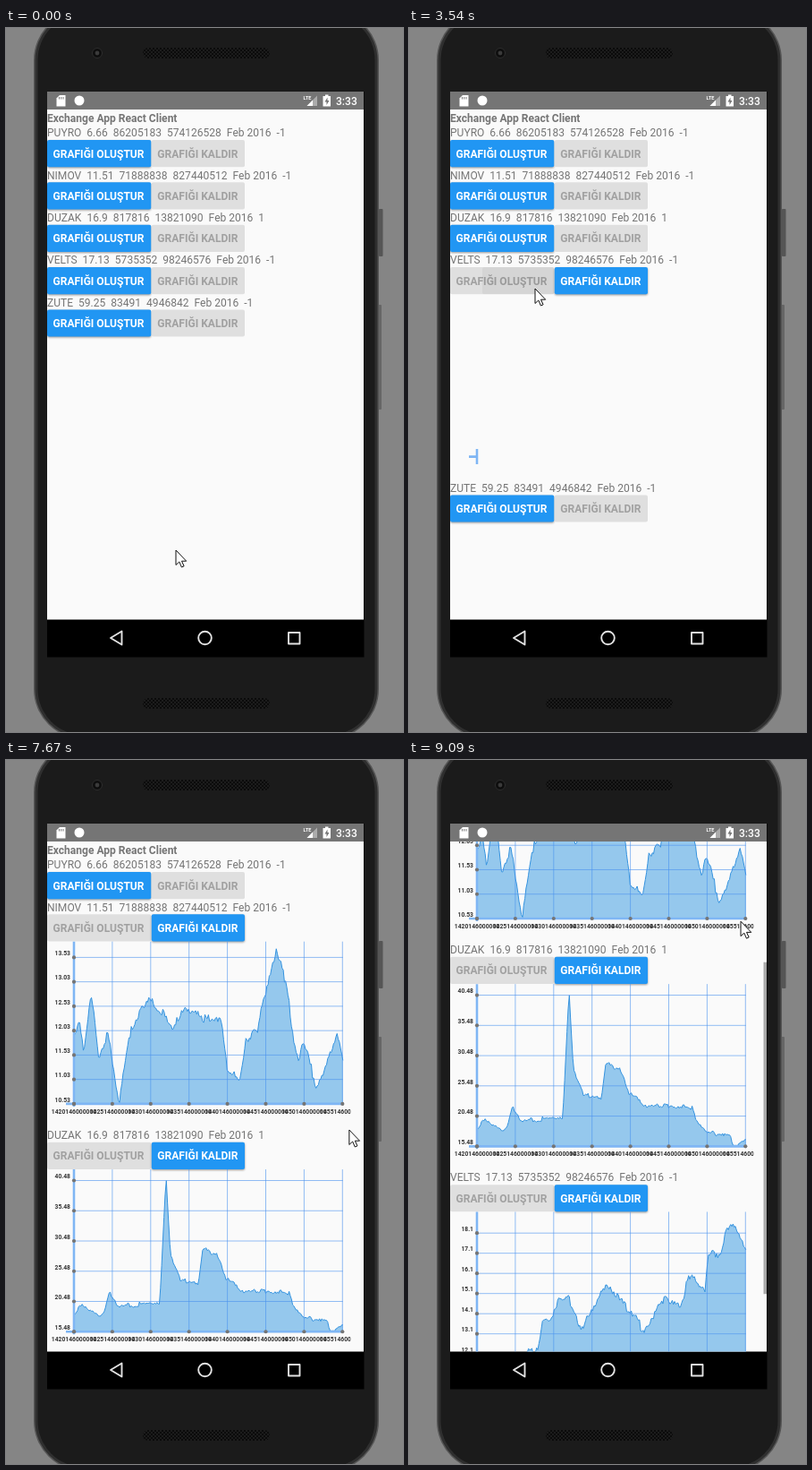
An HTML page that plays this animation: 444x786 px, repeating every 9.12 s.

```html
<!DOCTYPE html>
<html lang="tr">
<head>
<meta charset="utf-8">
<style>
  html, body { margin: 0; width: 100%; height: 100%; overflow: hidden; background: #858585; }
  svg { display: block; width: 444px; height: 786px; }
  text { font: 12.05px Roboto, sans-serif; fill: #757575; white-space: pre; }
  .bold { font-weight: 700; }
  .label { font-weight: 700; fill: #fff; }
  .clock { font-weight: 500; fill: #fff; }
  .off .label { fill: #a1a1a1; }
  .face { fill: #2196f3; filter: drop-shadow(0 1.2px 1.2px #0006); }
  .off .face { fill: #dfdfdf; filter: none; }
  .tick { font-size: 6.75px; font-weight: 700; fill: #333; }
  .grid { stroke: #4a92ee; stroke-opacity: .6; fill: none; }
  .axis { stroke: #7fb6f4; stroke-width: 2.6; fill: none; }
  .area { fill: #95c8ed; }
  .line { fill: none; stroke: #3492de; stroke-linejoin: round; }
  .nav { fill: none; stroke: #e2e2e2; stroke-width: 1.9; stroke-linejoin: round; }
</style>
</head>
<body>
<svg viewBox="0 0 444 786">
  <defs>
    <pattern id="holes" width="4" height="4" patternUnits="userSpaceOnUse">
      <rect width="4" height="4" fill="#0b0b0b"/><circle cx="1" cy="1" r=".8" fill="#303030"/><circle cx="3" cy="3" r=".8" fill="#303030"/>
    </pattern>
    <clipPath id="view"><rect x="46" y="91" width="354" height="569.5"/></clipPath>
    <clipPath id="plot"><rect x="46" y="-2" width="339.5" height="206"/></clipPath>
  </defs>

  <rect x="417" y="202" width="4.5" height="53" rx="1" fill="#555"/>
  <rect x="416" y="309" width="4" height="117" rx="1" fill="#666"/>
  <rect x="31" y="-20" width="386" height="814" rx="56" fill="#555"/>
  <rect x="32.5" y="-18.5" width="383" height="811" rx="54.5" fill="#2f2f2f"/>
  <rect x="35.5" y="-15.5" width="377" height="805" rx="51.5" fill="#1b1b1b"/>
  <circle cx="102" cy="28" r="5.5" fill="#0e0e0e" stroke="#2e2e2e"/>
  <circle cx="102" cy="28" r="2.4" fill="#3a3a3a"/>
  <rect x="153" y="22" width="142" height="12" rx="6" fill="url(#holes)"/>
  <rect x="153" y="748" width="142" height="12" rx="6" fill="url(#holes)"/>

  <rect x="46" y="71" width="354.5" height="631.5"/>
  <rect x="46" y="91" width="354" height="569.5" fill="#fafafa"/>
  <g clip-path="url(#view)">
    <g id="list"><text class="bold" x="46" y="104.7">Exchange App React Client</text></g>
    <rect id="bar" x="396.5" width="3.5" height="370.5" fill="#a9a9a9"/>
  </g>

  <rect x="46" y="71" width="354" height="20" fill="#757575"/>
  <g fill="#fff">
    <path d="M60 75h6.5v12.5h-10v-9z"/>
    <path d="M59.5 77v2.5M61.7 77v2.5M64 77v2.5" stroke="#757575"/>
    <circle cx="82" cy="81" r="5.5"/>
    <path d="M348 75.5v11.5h-11.5z" opacity=".4"/>
    <path d="M343 80.5v6.5h-6.5z"/>
    <path d="M357 76v-1.5h3.5v1.5h2.5v11.5h-8.5v-11.5z"/>
    <path d="M359.5 77.5l-3 5h2v3.5l3-5h-2z" fill="#757575"/>
  </g>
  <text x="332.5" y="80" style="font-size:5.5px;font-weight:700;fill:#fff">LTE</text>
  <text class="clock" x="369" y="85.7">3:33</text>

  <path class="nav" d="M129.5 673.5v15l-12.5-7.5z"/>
  <circle class="nav" cx="222.5" cy="681" r="7.3"/>
  <rect class="nav" x="316" y="675" width="12.5" height="12.5"/>

  <path id="cursor" d="M0 0V16.5L3.8 13l2.6 6 2.7-1.2-2.6-5.6h5.2z" fill="#fff" stroke="#111"/>
</svg>

<script>
const LOOP = 9120, DRAG = 7975, TOP = 108, ROW = 47.35, CHART = 207, BASE = 181.2;
const LEFT = 76, STEP_X = 42.9, RIGHT = LEFT + 7 * STEP_X + .5;

// trend: key points (x, height above the axis) that seeded noise roughens
// open: row unfolds, ready: chart is drawn, ripple: left edge of the pressed tint
const rows = [
  { text: 'PUYRO  6.66  86205183  574126528  Feb 2016  -1' },
  { text: 'NIMOV  11.51  71888838  827440512  Feb 2016  -1', open: 6070, ready: 6510, ripple: 46,
    min: 10.53, step: .5, ticks: 7, gap: 27.25, digits: 2, jitter: 13,
    trend: [[76, 75], [82, 92], [87, 56], [95, 129], [104, 54], [114, 76], [127, 3], [140, 88], [161, 118],
      [186, 86], [203, 106], [241, 90], [249, 30], [262, 28], [268, 72], [281, 82], [302, 173], [315, 128],
      [319, 84], [327, 46], [333, 70], [347, 18], [358, 40], [370, 78], [376.5, 54]] },
  { text: 'DUZAK  16.9  817816  13821090  Feb 2016  1', open: 4880, ready: 5230, ripple: 46,
    min: 15.48, step: 5, ticks: 6, gap: 33.75, digits: 2, jitter: 6,
    trend: [[76, 20], [84, 29], [108, 19], [116, 42], [127, 28], [172, 33], [179, 173], [184, 86], [195, 57],
      [215, 54], [220, 94], [236, 85], [246, 60], [262, 46], [317, 43], [321, 28], [334, 15], [359, 12],
      [362, 0], [367, 0], [376.5, 9]] },
  { text: 'VELTS  17.13  5735352  98246576  Feb 2016  -1', open: 3450, ready: 3990, ripple: 82,
    min: 11.1, step: 1, ticks: 8, gap: 22.5, digits: 1, jitter: 11,
    trend: [[76, 17], [115, 6], [144, 32], [149, 57], [160, 62], [168, 88], [180, 82], [193, 48], [220, 102],
      [240, 78], [263, 48], [283, 82], [307, 78], [312, 112], [331, 92], [335, 134], [349, 134], [355, 162],
      [365, 164], [376.5, 140]] },
  { text: 'ZUTE  59.25  83491  4946842  Feb 2016  -1', open: 820, ready: 1370, close: 2250, ripple: 46,
    min: 46.82, step: 5, ticks: 6, gap: 30.8, digits: 2, jitter: 10,
    trend: [[76, 25], [82, 46], [86, 112], [98, 124], [119, 78], [128, 6], [132, 66], [165, 90], [168, 150],
      [178, 150], [186, 104], [192, 46], [198, 132], [213, 166], [219, 125], [238, 76], [265, 78], [275, 116],
      [313, 128], [322, 95], [332, 66], [338, 86], [352, 62], [370, 58], [371, 128], [376.5, 78]] }
];

// start, end, x, y; the pointer rests between moves
const moves = [
  [0, 0, 190, 583], [100, 740, 126, 333], [1660, 2000, 176, 332], [2840, 3400, 141, 291], [4280, 4690, 125, 238],
  [5550, 6010, 127, 191], [6510, 7320, 386, 443], [7420, DRAG, 381, 373], [DRAG, 8500, 372, 265], [8500, LOOP, 371, 176]
];
const scroll = [[0, 0], [DRAG, 0], [8500, 103.5], [LOOP, 212]];

const $ = id => document.getElementById(id);
const noise = n => { const v = Math.sin(n * 12.9898) * 43758.5453; return v - Math.floor(v) - .5; };

function add(parent, tag, attrs = {}, text = '') {
  const el = document.createElementNS('http://www.w3.org/2000/svg', tag);
  for (const key in attrs) el.setAttribute(key, attrs[key]);
  el.textContent = text;
  return parent.appendChild(el);
}

function lerpKeys(keys, x) {
  let i = 1;
  while (i < keys.length - 1 && keys[i][0] <= x) i++;
  const [x1, y1] = keys[i - 1], [x2, y2] = keys[i];
  return y1 + (y2 - y1) * (x - x1) / (x2 - x1);
}

function button(parent, x, width, textX, caption) {
  const g = add(parent, 'g');
  add(g, 'rect', { class: 'face', x, y: 17, width, height: 30.2, rx: 2 });
  add(g, 'text', { class: 'label', x: textX, y: 36.7 }, caption);
  return g;
}

function curve({ trend, jitter }) {
  const points = [], count = 230;
  for (let i = 0; i <= count; i++) {
    const x = LEFT + (RIGHT - LEFT) * i / count;
    const rough = noise(i + jitter) * .5 + noise((i >> 2) + .5) * .7;
    points.push(`${x} ${BASE - Math.max(1, lerpKeys(trend, x) + rough * jitter)}`);
  }
  return 'M' + points.join('L');
}

function chart(parent, row) {
  const g = add(parent, 'g', { 'clip-path': 'url(#plot)' });
  const d = curve(row);
  add(g, 'path', { class: 'area', d: `${d}V${BASE}H${LEFT}Z` });
  add(g, 'path', { class: 'line', d });
  let grid = '';
  for (let i = 1; i < 8; i++) grid += `M${LEFT + i * STEP_X} 0V${BASE}`;
  for (let i = 1; i < row.ticks; i++) grid += `M${LEFT} ${BASE - i * row.gap}H${RIGHT}`;
  add(g, 'path', { class: 'grid', d: grid });
  add(g, 'path', { class: 'axis', d: `M${LEFT} 0V${BASE + 3}M67 ${BASE}H${RIGHT}` });
  const dot = (cx, cy) => add(g, 'circle', { cx, cy, r: 2.1, fill: '#757575' });
  for (let i = 0; i < row.ticks; i++) {
    const y = BASE - i * row.gap;
    dot(LEFT, y);
    add(g, 'text', { class: 'tick', x: 72, y: y - 2.2, 'text-anchor': 'end' }, (row.min + i * row.step).toFixed(row.digits));
  }
  for (let i = 0; i < 8; i++) {
    const x = LEFT + i * STEP_X;
    dot(x, BASE);
    add(g, 'text', { class: 'tick', x, y: BASE + 10.7, 'text-anchor': 'middle' }, `${1420 + 5 * i}146000000`);
  }
  return g;
}

for (const row of rows) {
  row.g = add($('list'), 'g');
  add(row.g, 'text', { x: 46, y: 13.3 }, row.text);
  row.create = button(row.g, 46, 116.3, 52.5, 'GRAFIĞI OLUŞTUR');
  row.remove = button(row.g, 162.8, 104.2, 169.3, 'GRAFIĞI KALDIR');
  if (!row.trend) continue;
  row.tint = add(row.create, 'rect', { x: row.ripple, y: 17, width: 162.3 - row.ripple, height: 30.2, rx: 2, opacity: .045 });
  const body = add(row.g, 'g', { transform: `translate(0 ${ROW})` });
  row.stub = add(body, 'path', { class: 'axis', d: `M${LEFT} ${BASE - 8.5}v17M67 ${BASE}h9` });
  row.chart = chart(body, row);
}

function pointerAt(t) {
  const i = moves.findLastIndex(m => m[0] <= t);
  const [start, end, x, y] = moves[i], [, , x0, y0] = moves[Math.max(0, i - 1)];
  let p = end > start ? Math.min(1, (t - start) / (end - start)) : 1;
  if (start < DRAG) p = p * p * (3 - 2 * p);
  return [x0 + (x - x0) * p, y0 + (y - y0) * p];
}

const show = (el, on) => el.style.display = on ? '' : 'none';

function draw(t) {
  let y = TOP;
  for (const row of rows) {
    const open = t >= row.open && !(t >= row.close);
    row.g.setAttribute('transform', `translate(0 ${y})`);
    row.create.setAttribute('class', open ? 'off' : '');
    row.remove.setAttribute('class', open ? '' : 'off');
    if (row.trend) {
      show(row.tint, open && t < row.ready + 45);
      show(row.stub, open && t < row.ready);
      show(row.chart, open && t >= row.ready);
    }
    y += ROW + (open ? CHART : 0);
  }
  const offset = lerpKeys(scroll, t);
  $('list').setAttribute('transform', `translate(0 ${-offset})`);
  $('bar').setAttribute('y', 91 + offset * .651);
  show($('bar'), offset > 0);
  $('cursor').setAttribute('transform', `translate(${pointerAt(t)})`);
}

const start = performance.now();
function frame() {
  draw((performance.now() - start) % LOOP);
  requestAnimationFrame(frame);
}
frame();
</script>
</body>
</html>
```
